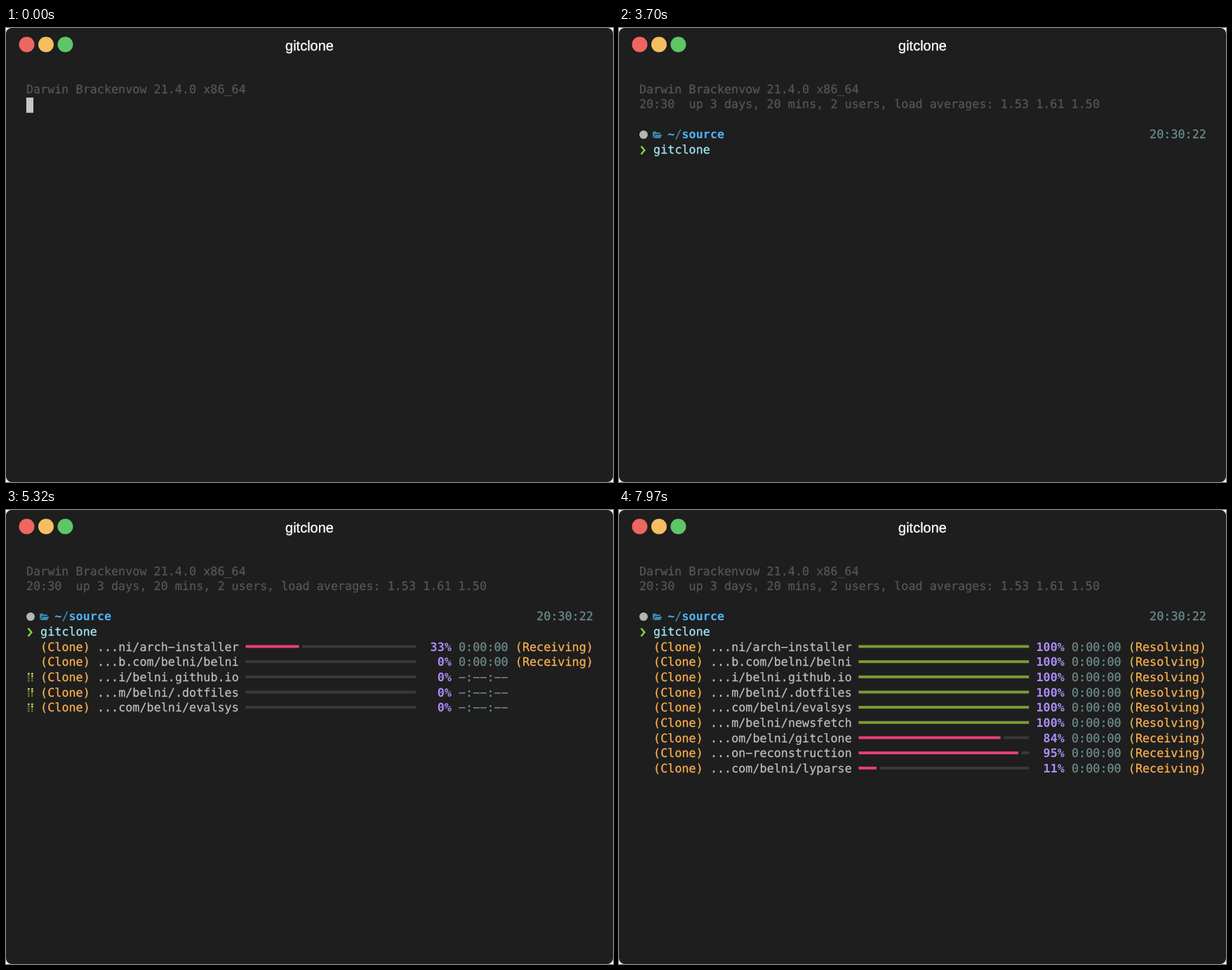
An HTML page for the animation above (8 s loop, 865 by 647 pixels).

```html
<!DOCTYPE html>
<html lang="en">
<head>
<meta charset="utf-8">
<title>gitclone</title>
<style>
  html, body { margin: 0; width: 100%; height: 100%; overflow: hidden; background: #fff; }
  svg { display: block; }
  text {
    font: 16.78px "DejaVu Sans Mono", monospace;
    white-space: pre;
    text-rendering: geometricPrecision;
    stroke-width: .25px;
  }
  .title { font: 20px "Liberation Sans", Arial, sans-serif; fill: #fff; stroke: #fff; stroke-width: .3px; text-anchor: middle; }
  .bold { font-weight: bold; stroke-width: 0; }
</style>
</head>
<body>
<svg width="865" height="647" viewBox="0 0 865 647">
  <rect width="865" height="647" rx="8" fill="#1e1e1e"/>
  <circle cx="29.5" cy="23.5" r="11" fill="#ee6660"/>
  <circle cx="57" cy="23.5" r="11" fill="#f6be61"/>
  <circle cx="84.5" cy="23.5" r="11" fill="#5dc667"/>
  <text class="title" x="432.5" y="31.5">gitclone</text>
  <g id="screen"></g>
</svg>
<script>
const LOOP = 8000, LEFT = 28.9, TOP = 77.5, CELL = 10.1, LINE = 21.66;
const COLOR = {
  dim: '#565656', gray: '#bdbdbd', cursor: '#c7c7c7', back: '#1e1e1e',
  blue: '#4fb4fb', folder: '#3c87b0', time: '#6e8c8c', prompt: '#82d63f',
  command: '#a5e8f5', orange: '#fbb04f', purple: '#ab8cf5',
  track: '#3a3a3a', active: '#e83f73', done: '#7a9b35', spinner: '#d2da58'
};
const COMMAND = 'gitclone', HINT = 'gitclone -v';
const KEYS = [990, 1110, 1270, 1610, 1730, 1950, 2170, 2295];
const ENTER = 2420, HIDE_CURSOR = 3700, CLONE = 4370;
const SPINNER = '⠋⠙⠹⠸⠼⠴⠦⠧⠇⠏';

// name, shown at, receiving from, progress until, percent reached, seconds left
const JOBS = [
  ['...ni/arch-installer', 4370, 5210, 5540, 100, 0],
  ['...b.com/belni/belni', 4370, 5320, 5650, 100, 0],
  ['...i/belni.github.io', 4370, 5430, 6245, 100, 1],
  ['...m/belni/.dotfiles', 4640, 5640, 5870, 100, 0],
  ['...com/belni/evalsys', 4890, 5750, 5980, 100, 0],
  ['...m/belni/newsfetch', 6020, 6390, 6740, 100, 0],
  ['...om/belni/gitclone', 6390, 6740, 7970, 84, 0],
  ['...on-reconstruction', 6480, 6830, 7970, 95, 0],
  ['...com/belni/lyparse', 6650, 7050, 7970, 11, 0]
].map(([name, start, receive, end, goal, left]) => ({ name, start, receive, end, goal, left }));

const span = (from, to, count) =>
  Array.from({ length: count }, (_, i) => from + (to - from) * i / (count - 1));
const STEPS = [
  0, 100, 180, ...KEYS, ENTER, HIDE_CURSOR,
  ...span(CLONE, 4990, 8), 5100, ...span(5210, 5980, 8),
  6100, ...span(6130, 6830, 9), ...span(6940, 7160, 3), 7730, 7970
];

const colX = col => LEFT + col * CELL;
const rowY = row => TOP + row * LINE;
const rect = (x, y, w, h, fill) => `<rect x="${x}" y="${y}" width="${w}" height="${h}" fill="${fill}"/>`;
// the wide minus gives the terminal's long hyphen
const text = (col, row, str, color, style = '') =>
  `<text class="${style}" x="${colX(col)}" y="${rowY(row) + 15}" fill="${color}" stroke="${color}">${str.replace(/-/g, '−')}</text>`;
const cursor = (col, row, char = '') =>
  rect(colX(col), rowY(row), CELL, LINE, COLOR.cursor) + text(col, row, char, COLOR.back);

function prompt() {
  return `<circle cx="35" cy="152" r="6" fill="#b4b4b4"/>
    <path d="M48 156V148.5q0-1 1-1h3.5l1.5 1.5h4q1 0 1 1v1H51.5L49 156ZM49.3 157l2.7-5h9.5l-2.7 5Z" fill="${COLOR.folder}"/>
    <path d="M31.5 168.5L36.3 174.2L31.5 180" fill="none" stroke="${COLOR.prompt}" stroke-width="2.5"/>` +
    text(4, 3, '~', COLOR.blue, 'bold') + text(5, 3, '/', COLOR.folder) +
    text(6, 3, 'source', COLOR.blue, 'bold') + text(72, 3, '20:30:22', COLOR.time);
}

function commandLine(t) {
  if (t >= ENTER) {
    return text(2, 4, COMMAND, COLOR.command) + (t < HIDE_CURSOR ? cursor(0, 5) : '');
  }
  const typed = KEYS.filter(key => t >= key).length;
  if (!typed) return cursor(2, 4);
  return text(2, 4, COMMAND.slice(0, typed), COLOR.command) +
    text(3 + typed, 4, HINT.slice(typed + 1), COLOR.dim) +
    cursor(2 + typed, 4, HINT[typed]);
}

// a braille cell of 2 by 4 dots; the bottom pair never lights up
function spinner(t, row) {
  const bits = SPINNER.charCodeAt(Math.floor((t - CLONE) / 80) % SPINNER.length) - 0x2800;
  return Array.from({ length: 8 }, (_, i) => {
    const col = i >> 2, line = i & 3;
    const lit = line < 3 && bits >> (3 * col + line) & 1;
    const look = lit
      ? `r="1.4" fill="${COLOR.spinner}"`
      : `r="1" fill="none" stroke="${COLOR.spinner}" stroke-width=".5"`;
    return `<circle cx="${32.3 + 5 * col}" cy="${rowY(row) + 4.4 + 3.3 * line}" ${look}/>`;
  }).join('');
}

function bar(row, width, percent) {
  const halves = Math.floor(width * 2 * percent / 100);
  const rest = halves ? halves + 1 : 0;
  const piece = (from, to, fill) => to > from
    ? rect(colX(31) - .6 + from * CELL / 2, rowY(row) + 6.7, (to - from) * CELL / 2 + .4, 4, fill)
    : '';
  return piece(rest, width * 2, COLOR.track) +
    piece(0, halves, percent === 100 ? COLOR.done : COLOR.active);
}

function jobLine(job, row, t, width) {
  const receiving = t >= job.receive;
  const part = Math.min(1, Math.max(0, (t - job.receive) / (job.end - job.receive)));
  const percent = Math.round(job.goal * part);
  const finished = percent === 100;
  const spinning = !receiving || job.left && !finished;
  const eta = receiving ? `0:00:0${finished ? 0 : job.left}` : '-:--:--';
  const col = 31 + width;
  return (spinning ? spinner(t, row) : '') +
    text(2, row, '(Clone)', COLOR.orange) + text(10, row, job.name, COLOR.gray) +
    bar(row, width, percent) +
    text(col + 1, row, `${percent}%`.padStart(4), COLOR.purple, 'bold') +
    text(col + 6, row, eta, COLOR.time) +
    (receiving ? text(col + 14, row, finished ? '(Resolving)' : '(Receiving)', COLOR.orange) : '');
}

function draw(t) {
  let out = text(0, 0, 'Darwin Brackenvow 21.4.0 x86_64', COLOR.dim);
  if (t < 100) return out + cursor(0, 1);
  out += text(0, 1, '20:30  up 3 days, 20 mins, 2 users, load averages: 1.53 1.61 1.50', COLOR.dim);
  if (t < 180) return out + cursor(0, 2);
  const width = JOBS.some(job => t >= job.receive) ? 24 : 34;
  return out + prompt() + commandLine(t) +
    JOBS.map((job, i) => t >= job.start ? jobLine(job, 5 + i, t, width) : '').join('');
}

const screen = document.getElementById('screen');
const begin = performance.now();
let shown = -1;
function tick() {
  const t = (performance.now() - begin) % LOOP;
  const step = STEPS.filter(s => s <= t).pop();
  if (step !== shown) {
    shown = step;
    screen.innerHTML = draw(step);
  }
  requestAnimationFrame(tick);
}
tick();
</script>
</body>
</html>
```
